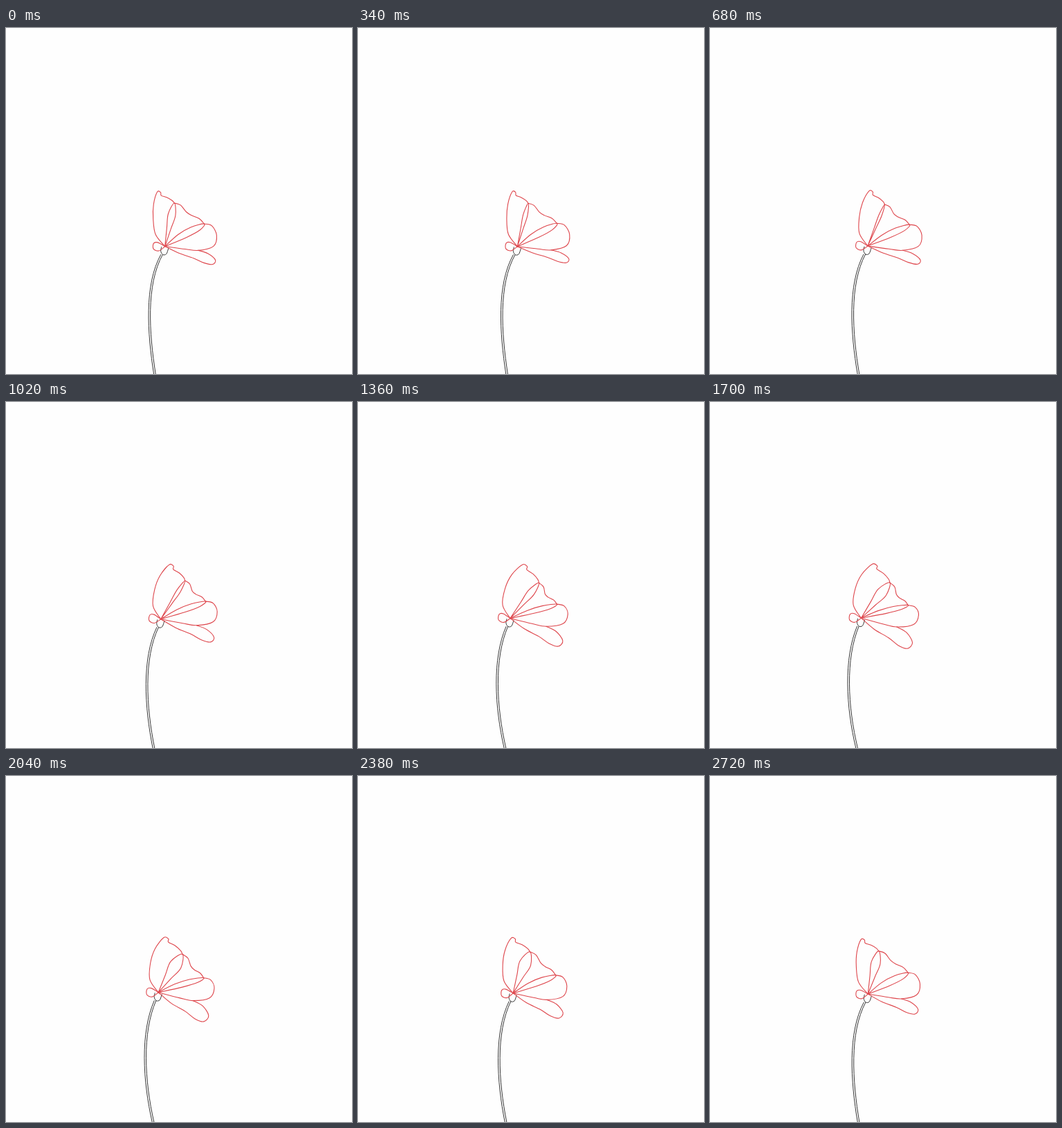
Animation, 500 px wide and 500 px high, one loop 2.89 s. Source, as an HTML page:

```html
<!DOCTYPE html>
<html lang="en">
<head>
<meta charset="utf-8">
<title>Swaying poppy</title>
<style>
  html, body { margin: 0; width: 100%; height: 100%; overflow: hidden; background: #fefefe; }
  svg { display: block; width: 100%; height: 100%; }
  path { fill: none; stroke-linecap: round; stroke-linejoin: round; }
  .petal { stroke: #de464c; stroke-width: 1.1; }
  .stem { stroke: #383838; stroke-width: 1; }
</style>
</head>
<body>
<svg id="stage" viewBox="0 0 500 500"></svg>
<script>
const STEP = 170, COUNT = 17;
const rad = deg => deg * Math.PI / 180;
const wave = (phase, lag) => Math.cos(rad(phase - lag));

// Petal points are [angle, radius] around the hub, with 0 degrees straight up.
const CENTER = [0, 0];
const CREST = [26, 65], NOTCH = [67, 68], FOLD = [100, 51];

const petals = {
  left: () => [CENTER, [-34, 22], [-16.5, 43.5], [-6.5, 63], [2.5, 79.5],
    [7, 78.5], [7.5, 74], [15, 71.5], [22.5, 68], CREST],
  middle: phase => {
    const open = 6.5 - 4 * Math.sin(rad(phase));
    const side = (dir, r) => [CREST[0], r, dir * open];
    return [CENTER, side(-1, 27), side(-1, 48), CREST, side(1, 48), side(1, 27), CENTER];
  },
  rim: () => [CREST, [34, 65], [44, 60], [51.5, 61], [59.5, 66], NOTCH],
  inner: () => [CENTER, [57, 26], [61.5, 48], NOTCH, [71, 58], [73, 35], CENTER],
  right: () => [NOTCH, [72, 77], [82, 80], [93, 73.5], FOLD, [101, 31], CENTER],
  low: () => [FOLD, [103, 66], [109.5, 79], [116, 77], [118.5, 64], [118, 47], [122, 24], CENTER],
  small: () => [CENTER, [-59, 12], [-73, 17], [-100, 17], [-124, 11], CENTER]
};
const cup = [[-5, 1], [-6, 7], [-3, 12], [2, 11], [5, 3]];

// The breeze bends the crown most and reaches the lower petals later.
function bend([angle, radius, spread = 0], phase, hub) {
  const amp = 3 + 11 * Math.exp(-(((angle - 28) / 42) ** 2)) + .25 * Math.max(0, angle - 98);
  const a = rad(angle + spread - amp * wave(phase, .4 * angle));
  const pull = .045 * Math.min(1, Math.max(0, angle / 80));
  const r = radius * (1 - pull * wave(phase, 0));
  return [hub[0] + r * Math.sin(a), hub[1] - r * Math.cos(a)];
}

// Smooth curve through all points.
function curve(pts) {
  const fix = n => n.toFixed(2);
  let d = "M" + pts[0].map(fix);
  for (let i = 0; i < pts.length - 1; i++) {
    const p = pts[i], q = pts[i + 1], o = pts[i - 1] || p, r = pts[i + 2] || q;
    const c1 = p.map((v, k) => fix(v + (q[k] - o[k]) / 6));
    const c2 = q.map((v, k) => fix(v - (r[k] - p[k]) / 6));
    d += `C${c1} ${c2} ${q.map(fix)}`;
  }
  return d;
}

function stemLine(hub, sway, shift) {
  const top = [hub[0] - 6 + shift, hub[1] + 12];
  const c1 = [196.5 + .6 * sway + shift, 371];
  const c2 = [200.5 + .7 * sway + shift, 440];
  const foot = [212.3 + .25 * sway + shift, 500];
  return `M${top}C${c1} ${c2} ${foot}`;
}

const svg = document.getElementById("stage");
function addPath(kind) {
  const path = document.createElementNS("http://www.w3.org/2000/svg", "path");
  path.setAttribute("class", kind);
  return svg.appendChild(path);
}

const lines = [];
const add = (kind, shape) => lines.push({ path: addPath(kind), shape });

for (const shift of [0, 2.6])
  add("stem", (phase, hub, sway) => stemLine(hub, sway, shift));
add("stem", (phase, hub) => curve(cup.map(([x, y]) => [hub[0] + x, hub[1] + y])));
for (const petal of Object.values(petals))
  add("petal", (phase, hub) => curve(petal(phase).map(p => bend(p, phase, hub))));

function draw(ms) {
  const phase = Math.floor(ms / STEP) % COUNT / COUNT * 360;
  const lean = wave(phase, 30), sway = 6 * lean;
  const hub = [224.5 + sway, 314 + 1.8 * lean];
  for (const { path, shape } of lines) path.setAttribute("d", shape(phase, hub, sway));
}

const start = performance.now();
function tick() {
  draw(performance.now() - start);
  requestAnimationFrame(tick);
}
tick();
</script>
</body>
</html>
```
